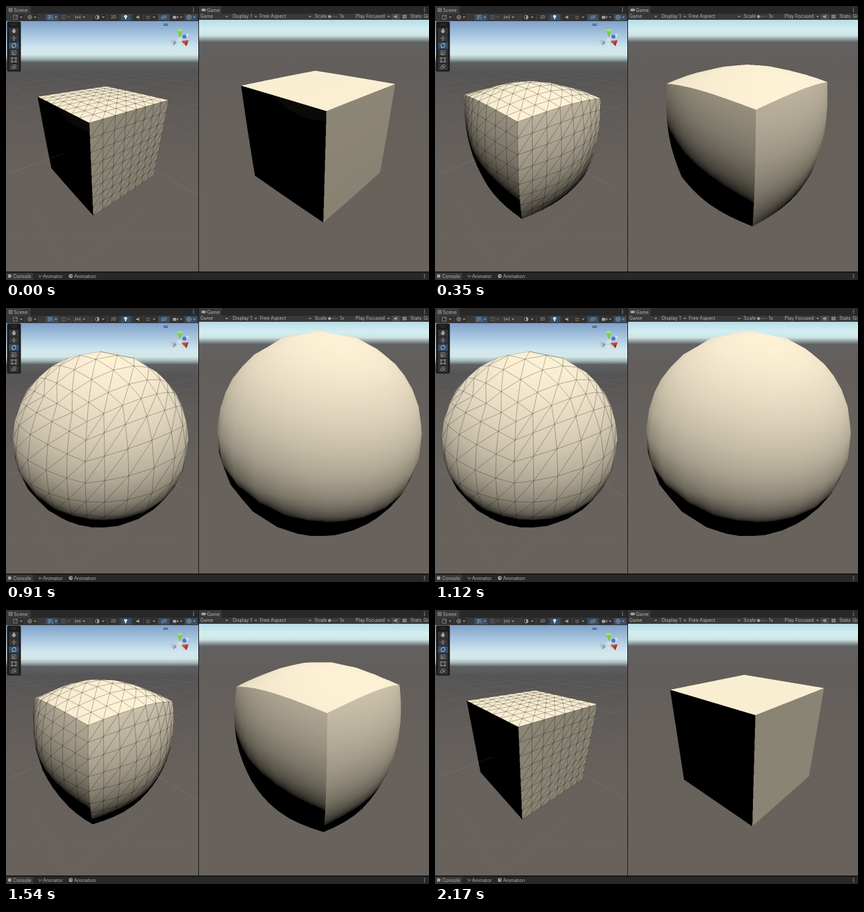
An HTML page with a canvas for the animation above (2240 ms loop, 640 by 416 pixels).

```html
<!DOCTYPE html>
<html lang="en">
<head>
<meta charset="utf-8">
<title>Cube to sphere</title>
<style>
html, body { margin: 0; width: 100%; height: 100%; overflow: hidden; background: #1b1b1b; }
canvas, svg { position: absolute; left: 0; top: 0; width: 640px; height: 416px; display: block; }
text { font: 7px Inter, Roboto, "Liberation Sans", sans-serif; fill: #b6b6b6; }
.icon { fill: none; stroke: #9c9c9c; stroke-width: .8; }
.dim { stroke: #666; }
.solid { fill: #a2a2a2; }
.on { fill: #36506b; }
</style>
</head>
<body>
<canvas id="view" width="640" height="416"></canvas>
<svg viewBox="0 0 640 416">
  <defs>
    <path id="drop" d="M0 0h4l-2 2.4z" fill="#999"/>
    <path id="dots" d="M0 0h1.3v1.3h-1.3zM0 2.6h1.3v1.3h-1.3zM0 5.2h1.3v1.3h-1.3z" fill="#a4a4a4"/>
  </defs>

  <!-- bars -->
  <path fill="#282828" d="M0 0h640v11.5H0zM0 405h640v11H0z"/>
  <path fill="#393939" d="M0 0h37v12H0zM292 0h34v12h-34zM0 11.5h291V23H0zM292 11.5h348V21H292zM0 405h41v11H0z"/>
  <path fill="#191919" d="M291 0h1v404h-1zM0 403h640v2H0z"/>

  <!-- tabs -->
  <path class="icon" d="M4.500 3.500h5v5h-5zM7 3.500v5M4.500 6h5"/>
  <text x="12" y="8.600">Scene</text>
  <rect class="solid" x="295.500" y="4" width="7" height="4" rx="2"/>
  <text x="304" y="8.600">Game</text>
  <use href="#dots" x="283" y="2.500"/><use href="#dots" x="632.500" y="2.500"/><use href="#dots" x="632.500" y="407"/>
  <rect class="solid" x="3" y="407.500" width="5" height="5" rx="1"/>
  <text x="11" y="412.600">Console</text>
  <path class="icon" d="M49 408l2 2h4M51 410v3"/>
  <text x="56" y="412.600">Animator</text>
  <circle class="solid" cx="98" cy="410" r="2.900"/><path d="M98 408v2h2" fill="none" stroke="#282828" stroke-width=".8"/>
  <text x="103" y="412.600">Animation</text>

  <!-- scene toolbar -->
  <path class="on" d="M60 12.500h19v9.500H60zM174 12.500h15v9.500h-15zM231 12.500h16v9.500h-16zM271 12.500h18v9.500h-18z"/>
  <path fill="#303030" d="M8 12.500h20v9.500H8zM30 12.500h18v9.500H30zM132 12.500h20v9.500h-20zM155 12.500h15v9.500h-15zM192 12.500h15v9.500h-15zM209 12.500h20v9.500h-20zM249 12.500h20v9.500h-20z"/>
  <g class="icon">
    <path d="M11 14h6v6h-6zM14 17l3-3"/>
    <circle cx="36" cy="17" r="3"/><path d="M33 17h6M36 14v6"/>
    <path d="M63 14.500h7M63 17h7M63 19.500h4M66 14v6M70 17v4"/>
    <path class="dim" d="M84 14.500h6v5h-6zM87 14.500v5"/>
    <path d="M105 14v6M112 14v6M105 17h7M108.500 15v4"/>
    <circle cx="138" cy="17" r="3"/>
    <path d="M235 17q4-4 8 0q-4 4-8 0zM235 20l8-6"/>
    <circle cx="277" cy="17" r="3.200"/><path d="M273.800 17h6.400M277 13.800v6.400"/>
  </g>
  <path class="solid" d="M138 14a3 3 0 0 1 0 6zM197 16h2l2.500-2v6l-2.500-2h-2zM252.500 15h5v4.500h-5zM258 17l2.500-2v4z"/>
  <path d="M181 13.800a2 2 0 0 1 1 3.900v2.300h-2v-2.300a2 2 0 0 1 1-3.900z" fill="#dde3e9"/>
  <path class="icon" d="M212 15l3 1.500 3-1.500M212 18l3 1.500 3-1.500"/>
  <use href="#drop" x="21" y="16"/><use href="#drop" x="42" y="16"/><use href="#drop" x="73.500" y="16"/>
  <use href="#drop" x="93" y="16" opacity=".5"/><use href="#drop" x="116" y="16"/><use href="#drop" x="145" y="16"/>
  <use href="#drop" x="222" y="16"/><use href="#drop" x="263" y="16"/><use href="#drop" x="283" y="16"/>
  <text x="158.500" y="19.300" style="font-size:6.300px">2D</text>

  <!-- game toolbar -->
  <text x="294" y="18.400">Game</text><use href="#drop" x="332" y="15"/>
  <text x="343" y="18.400">Display 1</text><use href="#drop" x="376" y="15"/>
  <text x="384" y="18.400">Free Aspect</text><use href="#drop" x="458" y="15"/>
  <text x="467" y="18.400">Scale</text>
  <path d="M488 16h14" stroke="#6a6a6a"/><circle cx="489.500" cy="16" r="2.300" fill="#a0a0a0"/>
  <text x="505" y="18.400">1x</text>
  <text x="529" y="18.400">Play Focused</text><use href="#drop" x="577" y="15"/>
  <path fill="#4c4c4c" d="M584 12h12v8.500h-12z"/>
  <path class="solid" d="M587 15h2l2.500-2v6l-2.500-2h-2zM600 13.500h6v5h-6z"/>
  <path d="M600 16h6M602 13.500v5M604 13.500v5" stroke="#444" stroke-width=".6"/>
  <text x="612" y="18.400">Stats</text><text x="632" y="18.400">Gi</text>

  <!-- tool palette -->
  <rect x="1.500" y="23.500" width="21" height="76" rx="2" fill="#1b1b1b"/>
  <path d="M8 27h8M8 29h8" stroke="#333"/>
  <path fill="#353535" d="M4.500 33h15v64.500h-15z"/>
  <path class="on" d="M4.500 55h15v10.500h-15z"/>
  <path stroke="#1f1f1f" stroke-width=".8" d="M4.500 43.800h15M4.500 54.700h15M4.500 65.600h15M4.500 76.400h15M4.500 87.200h15"/>
  <path class="solid" d="M9 38l1-2 1 1v-2.500h1v2-2.500h1v2.500l1-2v3l1.300-.8-1.800 4.300h-3z"/>
  <g class="icon">
    <path d="M12 45.500v7M8.500 49h7M11 46.500l1-1 1 1M11 51.500l1 1 1-1"/>
    <path d="M9.300 61.500a3.300 3.300 0 0 1 5-4M14.700 58.500a3.300 3.300 0 0 1-5 4M13 57.500h2M9 62.500h2" stroke="#d5dfe9"/>
    <path d="M9 68h6v6H9zM9 74l4-4M9 71h3v3"/>
    <path d="M9 79h6v5.500H9z"/><path d="M8 78h2v2H8zM14 78h2v2h-2zM8 83.500h2v2H8zM14 83.500h2v2h-2z" stroke-width=".5"/>
    <circle cx="10.500" cy="93.500" r="2"/><path d="M10 90l5-.5M12 94l4-3M13 92l2 3"/>
  </g>

  <!-- orientation gizmo -->
  <path d="M238 27.500h7M238 29.500h7" stroke="#304b70"/>
  <path d="M263 50l-8 4M263 50l9-5" stroke="#c8d4dd"/>
  <path fill="#dfe5e8" d="M273 42l4 1-3 5-3-2zM260 56l5 1-3 6z" opacity=".8"/>
  <path fill="#b9c1c5" d="M248 51l7 1 3 4-5 4z"/>
  <path fill="#8d9599" d="M255 52l3 4-5 4z"/>
  <path fill="#7ecb4b" d="M258.500 37q4.500-3 9 0l-4 11z"/>
  <ellipse cx="263" cy="36.700" rx="4.500" ry="1.800" fill="#a2df75"/>
  <circle cx="270" cy="46.500" r="3" fill="#4178cf"/>
  <path fill="#d6452f" d="M265 53l11-1-3 9z"/>
  <path fill="#9e2f22" d="M276 52l-3 9-2-4z"/>
  <path fill="#d7dcdf" d="M260 48h6v6h-6z"/>
  <path d="M250 77l3-2" stroke="#dce6e8" stroke-width=".8"/>
</svg>
<script>
const LOOP = 2240, STEP = 70, W = 640, H = 416;
const CELLS = 8, RADIUS = .96, SCALE = 2;
const ctx = document.getElementById('view').getContext('2d');
const rad = d => d * Math.PI / 180;
const mix = (a, b, t) => a.map((v, i) => v + (b[i] - v) * t);
const dot = (a, b) => a[0] * b[0] + a[1] * b[1] + a[2] * b[2];
const unit = a => { const l = Math.sqrt(dot(a, a)); return a.map(v => v / l); };

// Meshes are shaded pixel by pixel on a double-size layer, then scaled down.
const layer = document.createElement('canvas');
layer.width = W * SCALE;
layer.height = H * SCALE;
const layerCtx = layer.getContext('2d');
const image = layerCtx.createImageData(layer.width, layer.height);
const pixels = new Uint32Array(image.data.buffer);
const ramp = Uint32Array.from({ length: 1024 }, (_, i) => {
  const v = Math.pow(i / 1023, 1 / 2.2);
  return (255 << 24 | 214 * v << 16 | 242 * v << 8 | 254 * v) >>> 0;
});

// Model axes are two level cube edges and the vertical; camera axes are right, up, forward.
function camera(o) {
  const sp = Math.sin(rad(o.pitch)), cp = Math.cos(rad(o.pitch));
  const sy = Math.sin(rad(o.yaw)), cy = Math.cos(rad(o.yaw));
  const rows = [[cy, -sy, 0], [sy * sp, cy * sp, cp], [sy * cp, cy * cp, -sp]];
  const depth = p => o.at[2] + dot(rows[2], p);
  const project = p => {
    const z = depth(p);
    return [o.x + o.f * (o.at[0] + dot(rows[0], p)) / z,
            o.y - o.f * (o.at[1] + dot(rows[1], p)) / z];
  };
  return { ...o, depth, project };
}

const scene = camera({
  x: 145.5, y: 213, f: 250, pitch: 30, yaw: 38.9, at: [-.016, .0844, 2.03],
  box: [0, 23, 291, 380], wire: true,
  sky: [[23, '#80a2ca'], [46, '#acc9e1'], [64, '#d1e7ee'], [74, '#d3e7e8'], [80, '#a5b8ba'],
        [86, '#5d6062'], [100, '#555354'], [150, '#5f5b58'], [240, '#67615d'], [403, '#69625c']]
});
const game = camera({
  x: 466, y: 212, f: 340, pitch: 28.5, yaw: 47.6, at: [.0474, .1195, 2.3],
  box: [292, 21, 348, 382], wire: false,
  sky: [[21, '#b8dde7'], [36, '#d3eef0'], [45, '#cde3e3'], [50, '#95a3a4'],
        [55, '#626162'], [90, '#625e5b'], [190, '#67615c'], [403, '#69625c']]
});

function ease(x) {
  return (1 - Math.cos(Math.PI * Math.min(1, Math.max(0, x)))) / 2;
}

function roundness(ms) {
  const start = -80, since = ms > LOOP + start ? ms - LOOP : ms;
  return Math.min(ease((since - start) / 1060), 1 - ease((since - 1060) / 950));
}

function drawSky(cam) {
  const [x, y, w, h] = cam.box;
  const g = ctx.createLinearGradient(0, y, 0, y + h);
  for (const [at, color] of cam.sky) g.addColorStop(Math.min(1, (at - y) / h), color);
  ctx.fillStyle = g;
  ctx.fillRect(x, y, w, h);
}

function gridLine(cam, axis, k, from, to) {
  for (let s = from; s < to; s += .5) {
    const ends = [s, Math.min(to, s + .5)].map(v => axis ? [k, v, 0] : [v, k, 0]);
    if (ends.some(p => cam.depth(p) < .1)) continue;
    const fade = 1 - Math.hypot(k, s) / 16;
    if (fade <= 0) continue;
    ctx.strokeStyle = `rgba(132,140,138,${.3 * fade})`;
    ctx.beginPath();
    ctx.moveTo(...cam.project(ends[0]));
    ctx.lineTo(...cam.project(ends[1]));
    ctx.stroke();
  }
}

function drawGrid(cam, from, to) {
  ctx.lineWidth = .6;
  for (let k = from; k <= to; k++) for (const axis of [0, 1]) gridLine(cam, axis, k, -14, 14);
}

function buildFace(k, side, t) {
  // The light only grazes the left side, which stays dark until it bulges.
  const light = [-.11 * t, -.27, .96], flat = [0, 0, 0], grid = [];
  flat[k] = side;
  for (let i = 0; i <= CELLS; i++) {
    grid.push([]);
    for (let j = 0; j <= CELLS; j++) {
      const p = [0, 0, 0];
      p[k] = side / 2;
      p[(k + 1) % 3] = i / CELLS - .5;
      p[(k + 2) % 3] = j / CELLS - .5;
      const out = unit(p);
      grid[i].push({
        p: mix(p, out.map(v => v * RADIUS), t),
        lit: dot(unit(mix(flat, out, t)), light) * 1.02 - .01
      });
    }
  }
  return { k, side, grid };
}

const cross = (a, b, x, y) => (b.x - a.x) * (y - a.y) - (b.y - a.y) * (x - a.x);

// Triangles of a face that look towards the camera, in screen space.
function visibleTriangles(cam, { k, side, grid }) {
  const pts = grid.map(row => row.map(v => {
    const [x, y] = cam.project(v.p);
    return { x, y, lit: v.lit };
  }));
  const list = [];
  for (let i = 0; i < CELLS; i++)
    for (let j = 0; j < CELLS; j++) {
      const a = pts[i][j], b = pts[i + 1][j], c = pts[i + 1][j + 1], d = pts[i][j + 1];
      list.push(...(k ? [[a, b, c], [a, c, d]] : [[a, b, d], [b, c, d]]));
    }
  return list.filter(([a, b, c]) => cross(a, b, c.x, c.y) * side < 0);
}

function shadeTriangle([a, b, c]) {
  const area = cross(a, b, c.x, c.y);
  const low = key => Math.floor(Math.min(a[key], b[key], c[key]) * SCALE);
  const high = key => Math.ceil(Math.max(a[key], b[key], c[key]) * SCALE);
  const right = high('x'), bottom = high('y');
  for (let py = low('y'); py <= bottom; py++)
    for (let px = low('x'); px <= right; px++) {
      const x = (px + .5) / SCALE, y = (py + .5) / SCALE;
      const u = cross(b, c, x, y) / area, v = cross(c, a, x, y) / area, w = 1 - u - v;
      if (u < -1e-6 || v < -1e-6 || w < -1e-6) continue;
      const lit = u * a.lit + v * b.lit + w * c.lit;
      pixels[py * layer.width + px] = ramp[Math.min(1, Math.max(0, lit)) * 1023 | 0];
    }
}

function drawWire(triangles) {
  ctx.lineWidth = .5;
  ctx.strokeStyle = 'rgba(0,0,0,.3)';
  for (const [a, b, c] of triangles) {
    ctx.beginPath();
    ctx.moveTo(a.x, a.y);
    ctx.lineTo(b.x, b.y);
    ctx.lineTo(c.x, c.y);
    ctx.closePath();
    ctx.stroke();
  }
}

function drawView(cam, faces, t) {
  const [x, y, w, h] = cam.box;
  const triangles = faces.flatMap(f => visibleTriangles(cam, f));
  pixels.fill(0);
  triangles.forEach(shadeTriangle);
  layerCtx.putImageData(image, 0, 0);

  ctx.save();
  ctx.beginPath();
  ctx.rect(x, y, w, h);
  ctx.clip();
  drawSky(cam);
  if (cam.wire) drawGrid(cam, 0, 14);
  ctx.drawImage(layer, 0, 0, W, H);
  if (cam.wire) {
    drawWire(triangles);
    drawGrid(cam, -14, -1);
    const skin = .5 + (RADIUS - .5) * t;
    for (const axis of [0, 1]) gridLine(cam, axis, 0, -1.5, -skin);
  }
  ctx.restore();
}

function draw(ms) {
  const t = roundness(ms), faces = [];
  for (const k of [0, 1, 2]) for (const side of [-1, 1]) faces.push(buildFace(k, side, t));
  drawView(scene, faces, t);
  drawView(game, faces, t);
}

const began = performance.now();
let shown = -1;
function tick() {
  const step = Math.floor((performance.now() - began) % LOOP / STEP);
  if (step !== shown) draw((shown = step) * STEP);
  requestAnimationFrame(tick);
}
tick();
</script>
</body>
</html>
```
